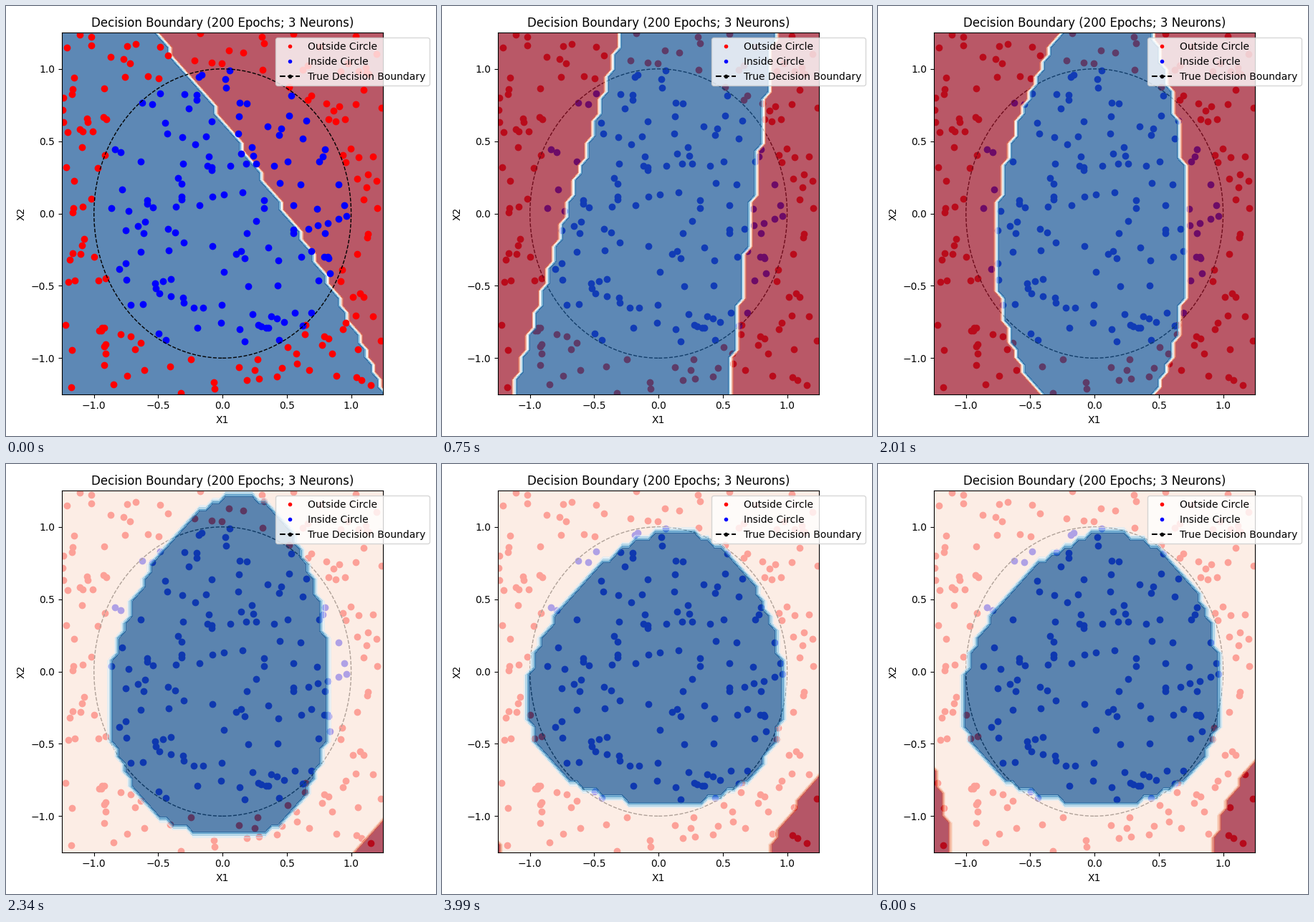
These frames come from a looping animation (600 by 600 pixels, 6030 ms). A matplotlib script:

```python
import numpy as np
import matplotlib.pyplot as plt
from matplotlib.animation import FuncAnimation
from matplotlib.lines import Line2D

FRAMES, STEP = 201, 30
LIM = 1.25
CENTRE = (.1, -.15)

# Key poses of the blue region: time in ms, left edge and slope,
# right edge, slope and bow, then how far the edges close above and below.
POSES = np.array([
    (0, -2.5, .83, .5, -.72, -.08, 0, 0),
    (450, -1.01, .83, .684, .06, -.05, 0, 0),
    (660, -.72, .38, .74, .16, 0, 0, 0),
    (1260, -.692, .105, .648, .03, 0, 0, 0),
    (1500, -.692, .105, .648, .03, 0, 0, 0),
    (2010, -.765, 0, .72, 0, 0, .6, .77),
    (2760, -1.02, 0, .955, 0, 0, .885, 1.299),
    (6000, -1.03, 0, .98, 0, 0, .897, 1.299),
])

axis = np.linspace(-LIM, LIM, 50)
XX, YY = np.meshgrid(axis, axis)


def make_points():
    pts = np.random.default_rng(7).uniform(-LIM, LIM, (400, 2))
    inside = np.hypot(*pts.T) < 1
    return pts[inside][:140], pts[~inside][:150]


def profile(up, down, p_up, p_down):
    """Relative half width at each height: 1 in the middle, 0 at the ends."""
    dy = YY - CENTRE[1]
    p = np.where(dy > 0, p_up, p_down)
    reach = np.clip(abs(dy) * np.where(dy > 0, up, down), 0, 1)
    return (1 - reach ** p) ** (1 / p)


def blue_region(t):
    l0, l1, r0, r1, bow, up, down = (
        np.interp(t, POSES[:, 0], col) for col in POSES.T[1:])
    cx = CENTRE[0]
    left = cx + (l0 - cx) * profile(up, down, 1.6, 2.3) + l1 * YY
    right = (cx + (r0 - cx) * profile(up, down, 2, 2.2)
             + r1 * YY + bow * YY ** 2)
    return (left < XX) & (XX < right)


def corner(x, foot, rim, power):
    """Bottom corner from x = foot on the floor up to y = rim at the wall."""
    if rim <= -LIM:
        return np.zeros(x.shape, bool)
    u = (YY + LIM) / (rim + LIM)
    return (u <= 1) & (x >= foot + (LIM - foot) * np.clip(u, 0, 1) ** power)


def predict(t):
    z = np.where(blue_region(t), 1, 0)
    power = np.interp(t, [2900, 6000], [1, 1.8])
    right = corner(XX, np.interp(t, [2010, 2900, 6000], [1.15, .82, .92]),
                   np.interp(t, [2010, 2040, 2900, 6000],
                             [-LIM, -1.15, -.77, -.61]), power)
    left = corner(-XX, np.interp(t, [4500, 6000], [LIM, 1.12]),
                  np.interp(t, [3900, 4700], [-LIM, -.68]), power)
    z[left | right] = -1
    return z


fig, ax = plt.subplots(figsize=(6, 6), dpi=100)
blue, red = make_points()
ax.scatter(*red.T, color='red')
ax.scatter(*blue.T, color='blue')
ax.add_patch(plt.Circle((0, 0), 1, color='black', fill=False, linestyle='--'))
ax.set(xlim=(-LIM, LIM), ylim=(-LIM, LIM), xlabel='X1', ylabel='X2',
       title='Decision Boundary (200 Epochs; 3 Neurons)')
ax.legend(handles=[
    Line2D([], [], color='red', marker='.', ls='', label='Outside Circle'),
    Line2D([], [], color='blue', marker='.', ls='', label='Inside Circle'),
    Line2D([], [], color='black', marker='.', ls='--',
           label='True Decision Boundary'),
], loc='upper left', bbox_to_anchor=(.65, 1))
fig.tight_layout()

shown = []


def update(i):
    while shown:
        shown.pop().remove()
    # The untrained map lies under the samples, later ones cover them.
    shown.append(ax.contourf(XX, YY, predict(i * STEP), cmap='RdBu', alpha=.7,
                             zorder=1.5 if i else .5))
    return shown


anim = FuncAnimation(fig, update, frames=FRAMES, interval=STEP,
                     repeat=True, repeat_delay=0, blit=False)
plt.show()
```
